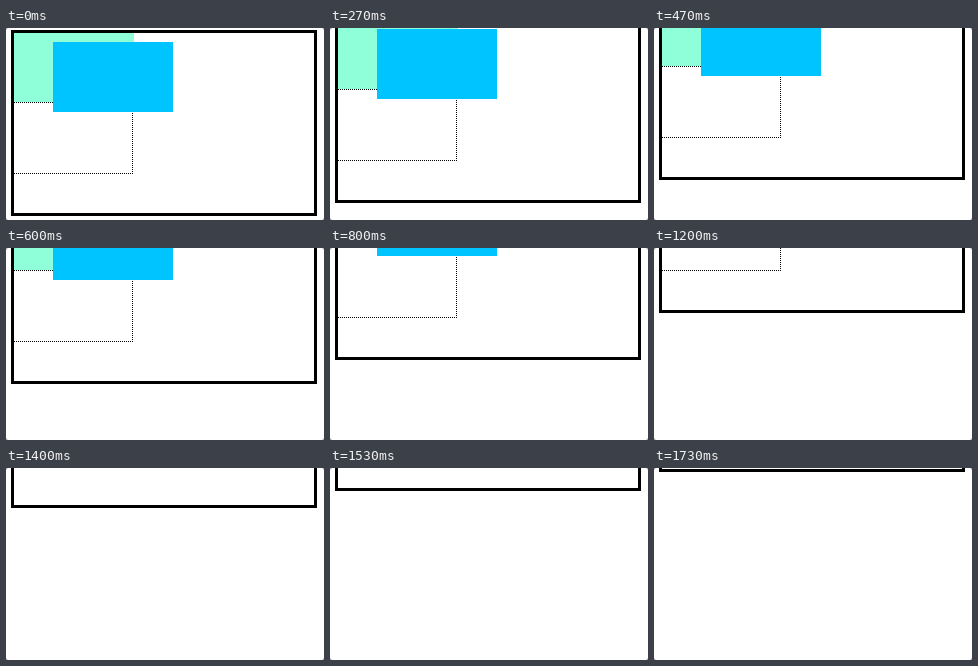
An HTML page that plays this animation: 318x192 px, repeating every 1790 ms.

```html
<!DOCTYPE html>
<html lang="en">
<head>
<meta charset="utf-8">
<title>Scrolling box</title>
<style>
  html, body { margin: 0; width: 100%; height: 100%; overflow: hidden; background: #fff; }
  svg { display: block; width: 318px; height: 192px; }
</style>
</head>
<body>
<svg viewBox="0 0 318 192" shape-rendering="crispEdges">
  <g id="page">
    <rect x="8" y="5" width="120" height="69" fill="#8effd9"/>
    <g fill="none" stroke="#000" stroke-dasharray="1 1">
      <path d="M8 74.5H127"/>
      <path d="M8 145.5H127"/>
      <path d="M126.5 75V146"/>
    </g>
    <rect x="6.5" y="3.5" width="303" height="183" fill="none" stroke="#000" stroke-width="3"/>
    <rect x="47" y="14" width="120" height="70" fill="#00c4ff"/>
  </g>
  <path fill="#aaa" shape-rendering="auto"
    d="M0 0h2L0 2zM318 0v2l-2-2zM0 192v-2l2 2zM318 192h-2l2-2z"/>
</svg>
<script>
  const LOOP = 1790;
  const STEP = 200 / 3;
  const page = document.getElementById('page');

  // Scroll offsets as [step, pixels]; the start accelerates, the rest is nearly steady.
  const keys = [[4, 13], [8, 44], [9, 52], [12, 76], [15, 98], [16, 107], [21, 148], [24, 173], [26, 184]];

  function scrollAt(step) {
    if (step <= 4) return Math.round(0.8 * step * step);
    const i = keys.findIndex(([k]) => k >= step);
    const [k0, y0] = keys[i - 1];
    const [k1, y1] = keys[i];
    return Math.round(y0 + (y1 - y0) * (step - k0) / (k1 - k0));
  }

  function render(ms) {
    const step = Math.min(26, Math.floor((ms % LOOP + 3.4) / STEP));
    page.setAttribute('transform', `translate(0 ${-scrollAt(step)})`);
  }

  const start = performance.now();
  function tick() {
    render(performance.now() - start);
    requestAnimationFrame(tick);
  }
  tick();
</script>
</body>
</html>
```
